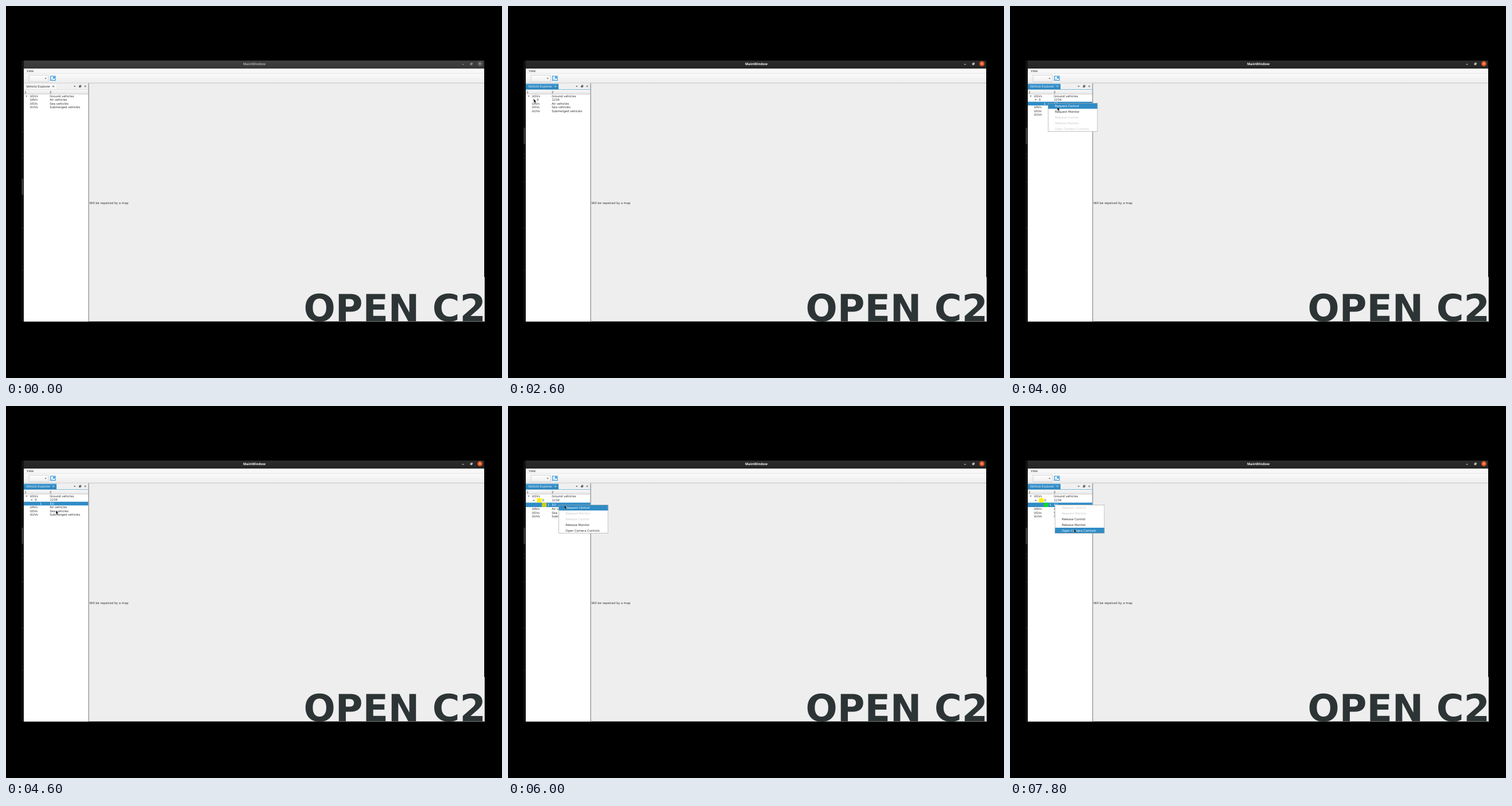
An HTML page with a canvas that plays this animation: 864 px wide and 648 px high, repeating every 8 s.

```html
<!DOCTYPE html>
<html lang="en">
<head>
<meta charset="utf-8">
<title>Vehicle explorer</title>
<style>
html, body { margin: 0; width: 100%; height: 100%; overflow: hidden; background: #000; }
canvas { display: block; }
</style>
</head>
<body>
<canvas width="864" height="648"></canvas>
<script>
const ctx = document.querySelector('canvas').getContext('2d');
const LOOP = 8000, STEP = 200;
const BLUE = '#308cc6', INK = '#303030', FAINT = '#c8c8c8';
const UI_FONT = '5.22px "DejaVu Sans", sans-serif';
const MENU_ITEMS = ['Request Control', 'Request Monitor', 'Release Control', 'Release Monitor', 'Open Camera Controls'];

// Pointer path: time, x, y
const PATH = [
  [400, 535, 325], [600, 330, 268], [800, 170, 215], [1000, 80, 185], [1400, 41, 166],
  [1600, 37, 157], [1800, 36, 155], [2200, 36, 155], [2600, 45, 162], [2800, 45, 162],
  [3200, 65, 168], [3600, 65, 168], [4000, 82.5, 176], [4400, 87, 183], [5000, 87, 180],
  [5200, 86, 171], [5600, 87, 171], [6200, 104, 174], [6600, 105, 175],
  [7000, 78, 171], [7200, 78, 171], [7800, 111.5, 214]
];

// Each menu is open only for a while; hover lists [start, item].
const MENUS = [
  { from: 3600, to: 4600, x: 66, y: 169, enabled: [0, 1], hover: [[3800, 0], [4200, 1]] },
  { from: 5600, to: 6600, x: 88, y: 172, enabled: [0, 3, 4], hover: [[5800, 0]] },
  { from: 7200, to: 8000, x: 78, y: 172, enabled: [2, 3, 4], hover: [[7400, 1], [7600, 3], [7800, 4]] }
];

function rect(x, y, w, h, fill) {
  ctx.fillStyle = fill;
  ctx.fillRect(x, y, w, h);
}

function shade(x, y, w, h, top, bottom) {
  const g = ctx.createLinearGradient(0, y, 0, y + h);
  g.addColorStop(0, top);
  g.addColorStop(1, bottom);
  rect(x, y, w, h, g);
}

function frame(x, y, w, h, color, width = 0.7) {
  ctx.strokeStyle = color;
  ctx.lineWidth = width;
  ctx.strokeRect(x, y, w, h);
}

// Text whose baseline lies a little below the row centre y.
function label(text, x, y, color = INK, font = UI_FONT, align = 'left') {
  ctx.font = font;
  ctx.textAlign = align;
  ctx.fillStyle = color;
  ctx.fillText(text, x, y + 1.9);
}

function polygon(points, fill) {
  ctx.beginPath();
  points.forEach(([x, y]) => ctx.lineTo(x, y));
  ctx.closePath();
  ctx.fillStyle = fill;
  ctx.fill();
}

function arrow(x, y, open, color = '#444') {
  polygon(open
    ? [[x - 1.7, y - 0.8], [x + 1.7, y - 0.8], [x, y + 1]]
    : [[x - 0.7, y - 1.5], [x + 1, y], [x - 0.7, y + 1.5]], color);
}

function cross(x, y, r, color) {
  ctx.strokeStyle = color;
  ctx.lineWidth = 0.8;
  ctx.beginPath();
  ctx.moveTo(x - r, y - r);
  ctx.lineTo(x + r, y + r);
  ctx.moveTo(x + r, y - r);
  ctx.lineTo(x - r, y + r);
  ctx.stroke();
}

function restoreIcon(x, y, color) {
  frame(x - 1.5, y - 0.6, 2.5, 2.2, color);
  frame(x - 0.5, y - 1.7, 2.3, 2.2, color);
}

function drawDesktop(focused) {
  rect(0, 0, 864, 648, '#000');
  rect(27, 95, 4, 455, '#111');
  rect(27.5, focused ? 212 : 301, 2.3, 28, '#444');
  for (const y of [219, 257, 265, 306, 386, 460]) rect(27.5, y, 2.5, 1, '#303030');
}

function drawTitleBar(focused) {
  const color = focused ? '#f4f4f4' : '#a8a8a8';
  if (focused) shade(31, 95, 802, 14, '#2c2c2c', '#242424');
  else shade(31, 95, 802, 14, '#404040', '#363636');
  label('MainWindow', 432.5, 101, color, 'bold 6px "Open Sans", sans-serif', 'center');
  rect(794.5, 101.3, 3.2, 0.8, color);
  restoreIcon(810.5, 100.8, color);
  ctx.beginPath();
  ctx.arc(825.5, 100.5, 4.4, 0, Math.PI * 2);
  ctx.fillStyle = focused ? '#e95420' : '#595959';
  ctx.fill();
  cross(825.5, 100.5, 1.4, focused ? '#fff' : '#ccc');
}

function drawWindow(focused) {
  drawTitleBar(focused);
  rect(31, 109, 802, 440.5, '#eee');
  shade(31, 109, 802, 9, '#fff', '#f2f2f2');
  shade(31, 118, 802, 16, '#fafafa', '#ededed');
  rect(31, 117.6, 802, 0.5, '#ddd');
  rect(31, 133.8, 802, 0.8, '#bbb');
  label('View', 36, 113);

  shade(40, 120.5, 34, 11.5, '#fdfdfd', '#f0f0f0');
  frame(40, 120.5, 34, 11.5, '#c6c6c6');
  arrow(69, 126.2, true, '#555');

  rect(77.5, 122.3, 8.5, 7.2, '#fff');
  frame(77.5, 122.3, 8.5, 7.2, '#2490dc', 1.1);
  rect(82, 123.5, 3, 2.8, '#2490dc');
  rect(79, 126.7, 2.2, 1, '#2490dc');

  label('Will be repalced by a map', 145.2, 342.6);
  label('OPEN C2', 518.5, 546.7, '#2d3436', 'bold 65px "DejaVu Sans", sans-serif');
  rect(833, 472, 0.8, 78, '#eee');
}

function drawDock(focused) {
  rect(31, 134.6, 112.5, 11, '#f0f0f0');
  if (focused) shade(31, 135.5, 57, 9.5, '#3a96d0', '#2d83ba');
  else rect(31, 135.5, 57, 9.5, '#f8f8f8');
  const color = focused ? '#e4f1f9' : INK;
  label('Vehicle Explorer', 35, 139.9, color);
  cross(82.5, 140, 1.3, color);
  arrow(119.7, 140, true, '#333');
  restoreIcon(129, 139.8, '#444');
  cross(138, 139.8, 1.4, '#444');

  rect(31, 145, 112.5, 404.5, '#fff');
  shade(31, 145.5, 112.5, 8, '#fafafa', '#e6e6e6');
  rect(31, 145, 112.5, 0.6, focused ? BLUE : '#ccc');
  rect(31, 153, 112.5, 0.6, '#bbb');
  label('1', 32.3, 149.8);
  label('2', 76, 149.8);
  rect(143.3, 134.6, 1.3, 415, '#929292');
}

function statusIcon(x, y, fill, hatched) {
  rect(x, y, 8, 7.4, fill);
  if (!hatched) return;
  ctx.save();
  ctx.beginPath();
  ctx.rect(x, y, 8, 7.4);
  ctx.clip();
  ctx.strokeStyle = '#527f62';
  ctx.lineWidth = 0.9;
  ctx.beginPath();
  for (let d = 0; d < 16; d += 3) {
    ctx.moveTo(x + d - 8, y);
    ctx.lineTo(x + d, y + 8);
  }
  ctx.stroke();
  ctx.restore();
}

function drawTree(t) {
  const expanded = t >= 2200, childShown = t >= 2800, selected = t >= 3600;
  const icons = t >= 5000, controlled = t >= 7000;
  let y = 157;
  arrow(36, y, expanded);
  label('UGVs', 41.5, y);
  label('Ground vehicles', 76.2, y);
  y += 6.5;
  if (expanded) {
    if (icons) y += 1;
    arrow(44.8, y, childShown);
    if (icons) statusIcon(50.5, y - 4, '#fff200');
    label('0', icons ? 59.5 : 50.2, y);
    label('1234', 76.5, y);
    y += icons ? 7.7 : 6.5;
  }
  if (childShown) {
    const color = selected ? '#fff' : INK;
    const height = icons ? 7.7 : 6.5;
    if (selected) rect(31, y - height / 2, 112.3, height, BLUE);
    if (icons) statusIcon(59, y - 3.7, controlled ? '#10d838' : '#fff200', !controlled);
    label('1', icons ? 68.8 : 58.8, y, color);
    label('EO', 76.5, y, color);
    y += icons ? 7.2 : 6.5;
  }
  for (const [code, name] of [['UAVs', 'Air'], ['USVs', 'Sea'], ['UUVs', 'Submerged']]) {
    label(code, 41.5, y);
    label(name + ' vehicles', 76.2, y);
    y += 6.5;
  }
}

function drawMenu(t, { x, y, enabled, hover }) {
  const active = hover.filter(([start]) => t >= start).pop()?.[1];
  rect(x, y, 86.5, 50, '#fff');
  MENU_ITEMS.forEach((text, i) => {
    const lit = i === active && enabled.includes(i);
    if (lit) rect(x, y + i * 10, 86.5, 10, BLUE);
    label(text, x + 12.3, y + i * 10 + 5, lit ? '#fff' : enabled.includes(i) ? INK : FAINT);
  });
  frame(x + 0.4, y + 0.4, 85.7, 49.2, '#a8a8a8');
}

function pointerAt(t) {
  const next = PATH.findIndex(([time]) => time > t);
  if (next === 0) return null;
  if (next < 0) return PATH[PATH.length - 1].slice(1);
  const [t0, x0, y0] = PATH[next - 1], [t1, x1, y1] = PATH[next];
  const k = (t - t0) / (t1 - t0);
  return [x0 + (x1 - x0) * k, y0 + (y1 - y0) * k];
}

function drawPointer(x, y) {
  const shape = [[0, 0], [0, 6.2], [1.4, 5], [2.4, 7.2], [3.5, 6.7], [2.6, 4.6], [4.4, 4.4]];
  polygon(shape.map(([dx, dy]) => [x + dx, y + dy]), '#151515');
  ctx.strokeStyle = 'rgba(255,255,255,.55)';
  ctx.lineWidth = 0.4;
  ctx.stroke();
}

function draw(now) {
  const t = Math.floor((now % LOOP) / STEP) * STEP;
  const focused = t >= 2200;
  ctx.textRendering = 'geometricPrecision';
  drawDesktop(focused);
  drawWindow(focused);
  drawDock(focused);
  drawTree(t);
  const menu = MENUS.find(({ from, to }) => t >= from && t < to);
  if (menu) drawMenu(t, menu);
  const pointer = pointerAt(t);
  if (pointer) drawPointer(...pointer);
}

const start = performance.now();
function tick() {
  draw(performance.now() - start);
  requestAnimationFrame(tick);
}
tick();
</script>
</body>
</html>
```
